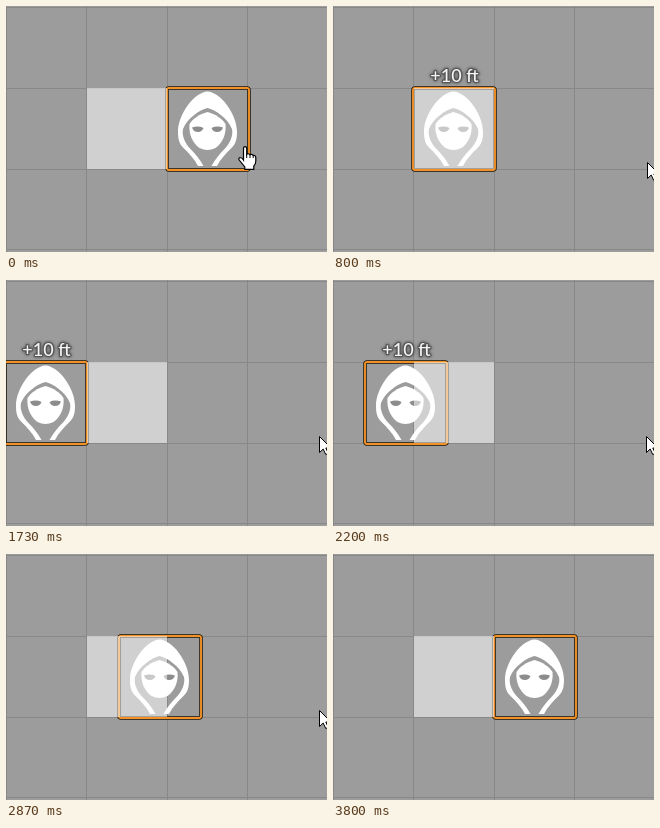
Recreate the animation shown at these times as an HTML page with a canvas. Size 321x246 px, loop 4790 ms.

```html
<!DOCTYPE html>
<html lang="en">
<head>
<meta charset="utf-8">
<title>Token crossing difficult terrain</title>
<style>
  html, body { margin: 0; width: 100%; height: 100%; overflow: hidden; background: #9c9c9c; }
  canvas { display: block; }
</style>
</head>
<body>
<canvas width="321" height="246"></canvas>
<script>
const ctx = document.querySelector('canvas').getContext('2d');
const LOOP = 4790, TICK = 1000 / 15, CELL = 81, HOME = 161;

// Icon paths are centred on x = 0
const hood = new Path2D(
  'M0 85.5C13 86 29.5 108 29.5 126C29.5 134 28 138 24 142C18 148 13 153 9.5 160H4' +
  'C8 153 12 148 17 143C22 138 26 130 24.5 123C20 112 8 104 0 102' +
  'C-8 104 -20 112 -24.5 123C-26 130 -22 138 -17 143C-12 148 -8 153 -4 160H-9.5' +
  'C-13 153 -18 148 -24 142C-28 138 -29.5 134 -29.5 126C-29.5 108 -13 86 0 85.5Z');
const face = new Path2D(
  'M0 106C8 108 15 113 18 118C19 128 15 137 8 142Q4 144 0 144' +
  'Q-4 144 -8 142C-15 137 -19 128 -18 118C-15 113 -8 108 0 106Z');
const eyes = new Path2D(
  'M4 122Q9 119.5 15.5 121.5Q14 126 9.5 126Q5.5 126 4 122Z' +
  'M-4 122Q-9 119.5 -15.5 121.5Q-14 126 -9.5 126Q-5.5 126 -4 122Z');
const arrow = new Path2D('M.5 .5V16.5L4.2 13L6.8 18.5L9.3 17.4L6.8 12H12Z');
const hand = new Path2D(
  'M5.5 14V2.5Q5.5 .7 7 .7Q8.7 .7 8.7 2.5V8.5Q10 6.8 12 8.8Q13.8 7.5 15.2 9.4' +
  'Q17.8 9 17.8 12V15Q17.8 18 15.8 20V23.3H6.8V21L1.2 14Q.2 12 2 11.5Q4 11.5 5.5 14Z');
const knuckles = new Path2D('M8.7 8.5V12M12 8.8V12M15.2 9.4V12');

const clamp = v => Math.max(0, Math.min(1, v));
const step = (n, start) => clamp((n - start) * 0.41);

function fill(path, color) {
  ctx.fillStyle = color;
  ctx.fill(path);
}

function stroke(path, color, width) {
  ctx.strokeStyle = color;
  ctx.lineWidth = width;
  ctx.stroke(path);
}

function at(x, y, draw) {
  ctx.save();
  ctx.translate(x, y);
  draw();
  ctx.restore();
}

function drawGrid() {
  ctx.fillStyle = '#9c9c9c';
  ctx.fillRect(0, 0, 321, 246);
  ctx.fillStyle = '#888';
  for (let k = 0; k < 4; k++) {
    ctx.fillRect(Math.floor(80.6 * k), 0, 1, 246);
    ctx.fillRect(0, Math.floor(1.5 + 80.8 * k), 321, 1);
  }
}

function drawToken() {
  fill(hood, '#fff');
  fill(face, '#fff');
  fill(eyes, '#8c8c8c');
  const frame = new Path2D();
  frame.roundRect(-40.5, 82, 82, 82, 2);
  stroke(frame, '#1c1408', 3.5);
  stroke(frame, '#f29127', 1.9);
}

function drawCost(x) {
  ctx.save();
  ctx.font = '500 18px Lato, "Open Sans", sans-serif';
  ctx.textAlign = 'center';
  ctx.lineJoin = 'round';
  ctx.lineWidth = 2;
  ctx.strokeStyle = '#555';
  ctx.shadowColor = '#333';
  ctx.shadowBlur = 3;
  ctx.strokeText('+10 ft', x, 76);
  ctx.shadowBlur = 0;
  ctx.fillStyle = '#f4f4f4';
  ctx.fillText('+10 ft', x, 76);
  ctx.restore();
}

function drawPointer(n) {
  if (n < 2) {
    at(232, 140, () => {
      fill(hand, '#fff');
      stroke(hand, '#000', 1.2);
      stroke(knuckles, '#000', 1);
    });
  } else if (n >= 8 && n < 57) {
    const p = clamp((n - 49) / 7);
    const x = n < 9 ? 317 : n < 26 ? 314 : 313 - 168 * p;
    at(Math.round(x), Math.round(156 + 80 * p), () => {
      fill(arrow, '#fff');
      stroke(arrow, '#000', 1);
    });
  }
}

function render(now) {
  const n = Math.floor((now % LOOP + 4) / TICK);
  const cells = step(n, 9.25) + step(n, 20) - step(n, 32) - step(n, 42);
  const center = Math.round(HOME - CELL * cells) + 40.5;

  drawGrid();
  at(center, 0, drawToken);
  ctx.fillStyle = 'rgba(255, 255, 255, .53)';
  ctx.fillRect(81, 82, 80, 81);
  if (n >= 12 && n < 36) drawCost(center + 1);
  drawPointer(n);
}

const start = performance.now();
function loop() {
  render(performance.now() - start);
  requestAnimationFrame(loop);
}
loop();
</script>
</body>
</html>
```
